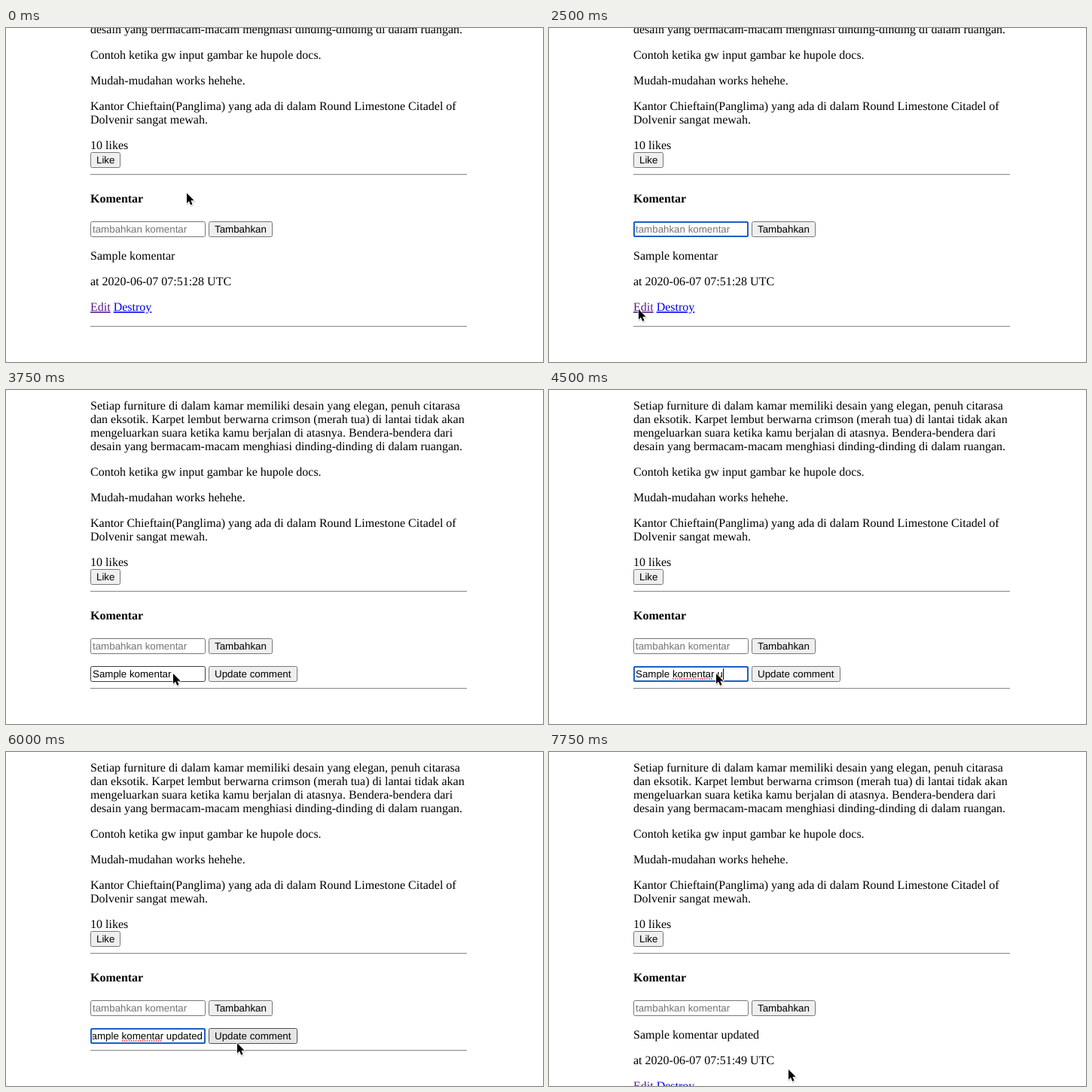
Recreate the animation shown at these times as an HTML page. Size 713x444 px, loop 8 s.

```html
<!DOCTYPE html>
<html lang="id">
<head>
<meta charset="utf-8">
<title>Komentar</title>
<style>
  html, body { margin: 0; width: 100%; height: 100%; overflow: hidden; background: #fff; }
  svg { display: block; }
  text { font: 16px "Liberation Serif", Times, serif; text-rendering: geometricPrecision; white-space: pre; }
  .ui { font: 13.333px "Liberation Sans", Arial, sans-serif; }
  .bold { font-weight: bold; }
  .hint { fill: #757575; }
  .link { text-decoration: underline; }
</style>
</head>
<body>
<svg id="stage" width="713" height="444" viewBox="0 0 713 444"></svg>
<script>
const LOOP = 8000, SHIFT = 73, LEFT = 112;
const FIELD = { x: 115, w: 147, y: 367 };
const NS = "http://www.w3.org/2000/svg";
const stage = document.getElementById("stage");

function add(parent, tag, attrs = {}, content = "") {
  const node = document.createElementNS(NS, tag);
  for (const key in attrs) node.setAttribute(key, attrs[key]);
  node.textContent = content;
  parent.appendChild(node);
  return node;
}
const group = (parent = stage) => add(parent, "g");
const text = (parent, x, y, content, cls = "", fill = "#000") =>
  add(parent, "text", { x, y, class: cls, fill: cls === "hint ui" ? "#757575" : fill }, content);
const show = (node, on) => node.setAttribute("display", on ? "inline" : "none");

function frame(parent, x, y, w, fill) {
  return add(parent, "rect", {
    x: x + .5, y: y + .5, width: w - 1, height: 20, rx: 2, fill, stroke: "#767676"
  });
}
function button(parent, x, y, w, label) {
  const box = frame(parent, x, y, w, "#efefef");
  text(parent, x + 8, y + 15, label, "ui");
  return box;
}
function rule(parent, y) {
  add(parent, "rect", { x: LEFT, y, width: 500, height: 1, fill: "#929292" });
  add(parent, "rect", { x: LEFT, y: y + 1, width: 500, height: 1, fill: "#e6e6e6" });
}
function focusRing(parent, y) {
  return add(parent, "rect", {
    x: 113, y: y + 1, width: 151, height: 19, rx: 1.5,
    fill: "none", stroke: "#1b5fc4", "stroke-width": 2
  });
}
function comment(parent, body, time) {
  const g = group(parent);
  text(g, LEFT, 308, body);
  text(g, LEFT, 342, `at 2020-06-07 ${time} UTC`);
  text(g, LEFT, 376, "Edit", "link", "#551a8b");
  text(g, 142.67, 376, "Destroy", "link", "#0000ee");
  rule(g, 396);
  return g;
}

// Article and comment list, which scroll together
const page = group();
[
  [-47, "Setiap furniture di dalam kamar memiliki desain yang elegan, penuh citarasa"],
  [-29, "dan eksotik. Karpet lembut berwarna crimson (merah tua) di lantai tidak akan"],
  [-11, "mengeluarkan suara ketika kamu berjalan di atasnya. Bendera-bendera dari"],
  [7, "desain yang bermacam-macam menghiasi dinding-dinding di dalam ruangan."],
  [41, "Contoh ketika gw input gambar ke hupole docs."],
  [75, "Mudah-mudahan works hehehe."],
  [109, "Kantor Chieftain(Panglima) yang ada di dalam Round Limestone Citadel of"],
  [127, "Dolvenir sangat mewah."],
  [161, "10 likes"]
].forEach(([y, line]) => text(page, LEFT, y, line));
button(page, LEFT, 165, 40, "Like");
rule(page, 194);
text(page, LEFT, 232, "Komentar", "bold");
frame(page, LEFT, 257, 153, "#fff");
text(page, 115, 272, "tambahkan komentar", "hint ui");
const newRing = focusRing(page, 257);
button(page, 269, 257, 85, "Tambahkan");
const before = comment(page, "Sample komentar", "07:51:28");
const after = comment(page, "Sample komentar updated", "07:51:49");

// Inline edit form
const form = group();
const editBox = frame(form, LEFT, FIELD.y, 153, "#fff");
const clip = add(add(stage, "defs"), "clipPath", { id: "field" });
add(clip, "rect", { x: FIELD.x, y: FIELD.y, width: FIELD.w, height: 21 });
const inner = add(form, "g", { "clip-path": "url(#field)" });
const value = text(inner, FIELD.x, FIELD.y + 15, "Sample komentar", "ui");
const squiggle = add(inner, "path", {
  d: "M1 384H55", stroke: "#f0483e", "stroke-width": 2,
  "stroke-linecap": "round", "stroke-dasharray": "0 3"
});
const caret = add(inner, "rect", { y: 370, width: 1, height: 15 });
const editRing = focusRing(form, FIELD.y);
const updateBox = button(form, 269, FIELD.y, 118, "Update comment");
rule(form, 396);

// Mouse pointer with a soft shadow
const pointer = group();
const arrow = "M0 0V13.4L3 10.6 5.2 15.8 7.5 14.8 5.3 9.8H9.6Z";
add(pointer, "path", {
  d: arrow, transform: "translate(.6 1.4)", fill: "#000", stroke: "#000",
  "stroke-width": 2, opacity: .14
});
add(pointer, "path", {
  d: arrow, fill: "#000", stroke: "#fff", "stroke-width": 1.4, "paint-order": "stroke"
});

// Pointer stops: time, x, y
const stops = [
  [0, 240, 219.5], [250, 236, 240], [500, 190, 300], [750, 156, 345], [1000, 153.5, 356],
  [1250, 160, 300], [1500, 165, 270], [1750, 130, 345], [2000, 118, 378], [2500, 119, 374],
  [3250, 146, 367], [3500, 196, 372], [3750, 222, 377],
  [5500, 243, 380], [5750, 288, 385], [6000, 307, 387],
  [6750, 332, 382], [7250, 330, 396], [7500, 322, 413], [7750, 318, 422]
];

function render(t) {
  const [, x, y] = stops.filter(stop => stop[0] <= t).pop();
  const scrolled = t >= 2750;
  const editing = scrolled && t < 6250;
  const focused = t >= 4000;
  const over = (left, right) => x >= left && x < right && y >= FIELD.y && y < FIELD.y + 21;

  page.setAttribute("transform", `translate(0 ${scrolled ? SHIFT : 0})`);
  show(before, !scrolled);
  show(after, t >= 6250);
  show(newRing, t >= 1500 && !scrolled);
  show(form, editing);
  pointer.setAttribute("transform", `translate(${x} ${y})`);
  if (!editing) return;

  const typed = Math.max(0, Math.min(8, 2 * (Math.floor((t - 4500) / 250) + 1)));
  value.textContent = "Sample komentar" + " updated".slice(0, typed);
  const width = value.getComputedTextLength();
  const start = FIELD.x - Math.max(0, width + 1 - FIELD.w);
  value.setAttribute("x", start);
  caret.setAttribute("x", Math.round(start + width));
  squiggle.setAttribute("transform", `translate(${start + 48.9} 0)`);
  show(caret, focused && t < 5500 && !(t >= 4250 && t < 4500));
  show(squiggle, t >= 4250);
  show(editRing, focused);
  editBox.setAttribute("stroke", over(LEFT, 265) ? "#3c3c3c" : "#767676");
  const hot = over(269, 387);
  updateBox.setAttribute("fill", hot ? "#e5e5e5" : "#efefef");
  updateBox.setAttribute("stroke", hot ? "#4f4f4f" : "#767676");
}

const origin = performance.now();
function tick() {
  render((performance.now() - origin) % LOOP);
  requestAnimationFrame(tick);
}
tick();
</script>
</body>
</html>
```
